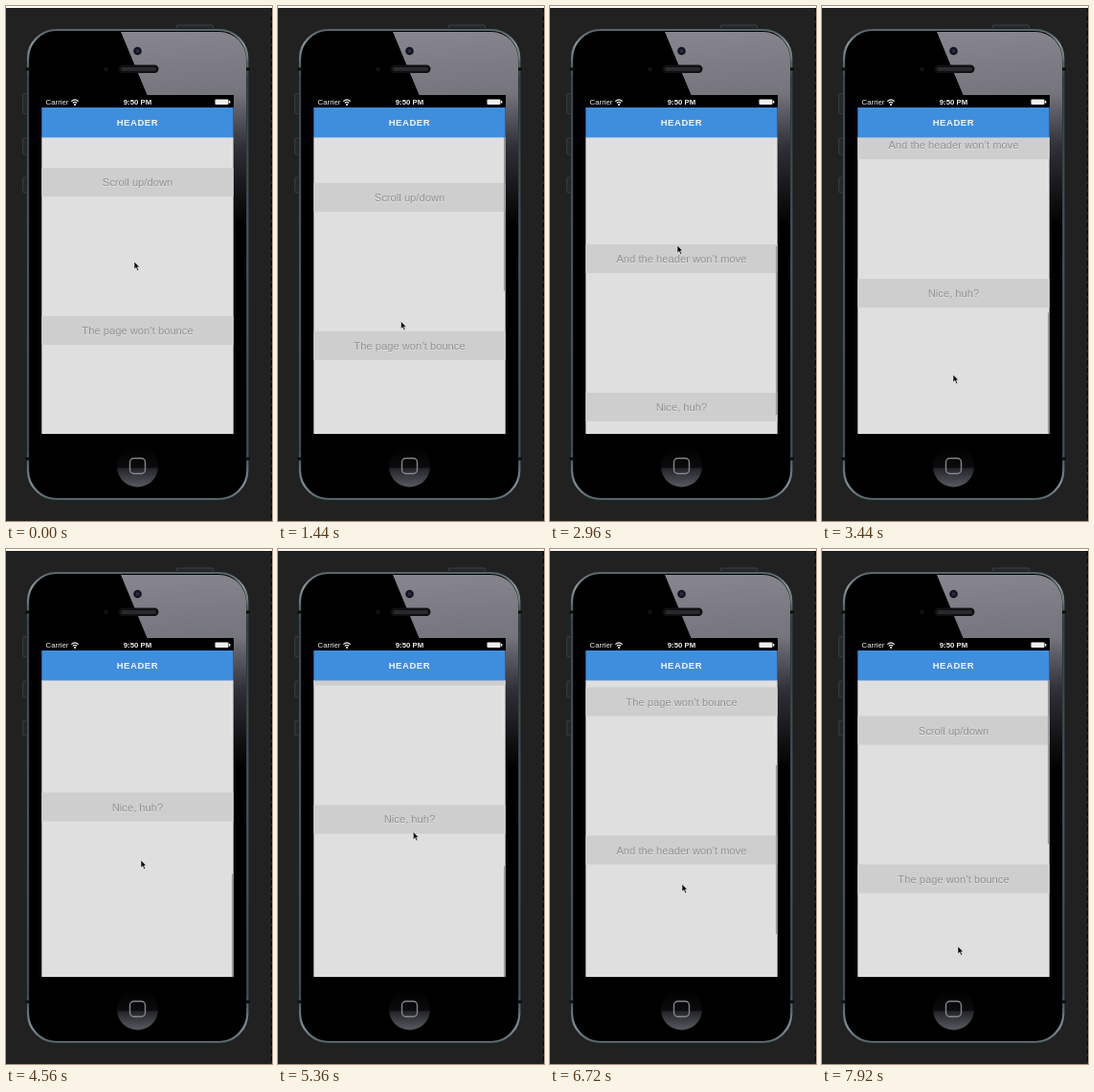
Recreate the animation shown at these times as an HTML page. Size 278x538 px, loop 8000 ms.

```html
<!DOCTYPE html>
<html lang="en">
<head>
<meta charset="utf-8">
<title>Scroll demo</title>
<style>
html, body { margin: 0; width: 100%; height: 100%; overflow: hidden; background: #212121; }
svg { display: block; width: 278px; height: 538px; }
text { font-family: "Liberation Sans", Arial, sans-serif; text-anchor: middle; }
.label rect { fill: #cecece; }
.label text { font-size: 11.2px; fill: #929292; text-shadow: 0 1px 0 #e2e2e2; }
.status { font-size: 7.8px; fill: #eee; }
</style>
</head>
<body>
<svg viewBox="0 0 278 538">
  <defs>
    <linearGradient id="rim" x1="0" y1="0" x2="0" y2="1">
      <stop offset="0" stop-color="#59646a"/>
      <stop offset=".03" stop-color="#8d989d"/>
      <stop offset=".1" stop-color="#38454a"/>
      <stop offset=".5" stop-color="#46555b"/>
      <stop offset=".9" stop-color="#3c4c52"/>
      <stop offset=".97" stop-color="#84929a"/>
      <stop offset="1" stop-color="#56646a"/>
    </linearGradient>
    <linearGradient id="glare" gradientUnits="userSpaceOnUse" x1="170" y1="27" x2="185" y2="235">
      <stop offset="0" stop-color="#86848c"/>
      <stop offset=".33" stop-color="#75757d"/>
      <stop offset=".6" stop-color="#2f3038"/>
      <stop offset="1" stop-color="#000"/>
    </linearGradient>
    <linearGradient id="home" x1="0" y1="0" x2="0" y2="1">
      <stop offset="0" stop-color="#000"/>
      <stop offset=".52" stop-color="#0b0b0d"/>
      <stop offset=".56" stop-color="#25262b"/>
      <stop offset="1" stop-color="#575a61"/>
    </linearGradient>
    <clipPath id="face"><rect x="25" y="27" width="226" height="486" rx="28"/></clipPath>
    <clipPath id="page"><rect x="37.3" y="137" width="200.4" height="310"/></clipPath>
  </defs>

  <rect width="278" height="538" fill="#212121"/>
  <rect width="278" height="2" fill="#fff"/>
  <path d="M277.4 2V538" stroke="#000" stroke-dasharray="5 3"/>

  <g fill="#22282b" stroke="#454c50" stroke-width=".7">
    <rect x="17.7" y="91.5" width="5" height="21" rx="1"/>
    <rect x="17.7" y="138" width="5" height="17" rx="1.5"/>
    <rect x="17.7" y="179" width="5" height="16" rx="1.5"/>
    <rect x="178.5" y="20" width="38" height="4" rx="1"/>
  </g>
  <rect x="21" y="23" width="233.3" height="494" rx="32" fill="#1b2529"/>
  <rect x="23" y="25" width="229.3" height="490" rx="30" fill="#000" stroke="url(#rim)" stroke-width="2.2"/>
  <path d="M20.5 66H25M250 66H254.8M20.5 473H25M250 473H254.8" stroke="#0a0c0d" stroke-width="3"/>

  <path d="M120 27H252V240H238V93H147.5Z" fill="url(#glare)" clip-path="url(#face)"/>
  <circle cx="137.5" cy="47" r="4.3" fill="#14151c"/>
  <circle cx="137.5" cy="47" r="2" fill="#262b4c"/>
  <circle cx="104.5" cy="66" r="2.2" fill="#131316"/>
  <rect x="117.5" y="61.5" width="42" height="8.5" rx="4.2" fill="#101012"/>
  <rect x="120" y="64" width="37" height="4" rx="2" fill="#29292c"/>

  <circle cx="137.5" cy="481" r="21.5" fill="url(#home)"/>
  <rect x="129.5" y="472.5" width="16" height="16" rx="4" fill="none" stroke="#85878a" stroke-width="1.4"/>

  <rect x="37.3" y="93" width="200.4" height="354" fill="#000"/>
  <text class="status" x="53.5" y="103">Carrier</text>
  <text class="status" x="137.5" y="103" font-weight="bold">9:50 PM</text>
  <g fill="none" stroke="#eee" stroke-width="1.2">
    <path d="M68.3 99.6Q72 96 75.7 99.6M69.8 101.4Q72 99.3 74.2 101.4"/>
    <circle cx="72" cy="103" r=".5"/>
  </g>
  <rect x="218.5" y="97.5" width="14" height="5.5" rx="1" fill="#eee"/>
  <rect x="233" y="99" width="1.4" height="2.5" fill="#eee"/>

  <g clip-path="url(#page)">
    <rect x="37" y="137" width="201" height="310" fill="#dfdfdf"/>
    <g id="content"></g>
    <rect id="bar" x="236.1" width="1.6" fill="#8d8d8d"/>
  </g>
  <rect x="37.3" y="106" width="200.4" height="31.4" fill="#3f8edd"/>
  <text x="137.4" y="125.2" font-size="9.5" font-weight="bold" letter-spacing=".55" fill="#f2f6fb">HEADER</text>

  <path id="cursor" d="M0 0V8L1.9 6.3L3.3 9.4L4.7 8.8L3.3 5.8H5.7Z" fill="#0a0a0a" stroke="#eee" stroke-width=".6"/>
</svg>
<script>
const LOOP = 8000, STEP = 80;
const TOP = 137, VIEW = 310, BAR = 176.5;
const MAX = 270, SQUASH = .63;
const $ = id => document.getElementById(id);

const labels = ["Scroll up/down", "The page won’t bounce", "And the header won’t move", "Nice, huh?"];
$("content").innerHTML = labels.map((s, i) =>
  `<g class="label" transform="translate(0 ${169 + i * 155})">
    <rect x="37" width="201" height="30"/><text x="137.5" y="19">${s}</text></g>`).join("");

// Turning points of the gestures: [time, content offset, pointer x, pointer y]
const keys = [
  [0, 0, 134, 267],
  [1200, 0, 129, 294],
  [1840, 50, 128, 394],     // pulled past the top
  [2160, 27, 128, 394],
  [2480, 0, 128, 394],
  [2960, -230, 133, 250],   // flung down the page
  [3440, -349, 137, 385],
  [4560, -379.5, 141, 325], // pulled past the bottom
  [5000, -390, 141, 305],
  [6000, -276, 142, 286],   // sprung back
  [6720, -179.5, 138, 350],
  [7920, 5.5, 142, 415]
];

const slope = (k, col) => keys[k] && keys[k + 1]
  ? (keys[k + 1][col] - keys[k][col]) / (keys[k + 1][0] - keys[k][0]) : 0;

// Harmonic mean of both slopes, flat at turning points
function tangent(k, col) {
  const a = slope(k - 1, col), b = slope(k, col);
  return a * b <= 0 ? 0 : 2 * a * b / (a + b);
}

// Monotone cubic through one column of the keys
function sample(t, col) {
  const i = keys.findIndex(k => k[0] > t) - 1;
  if (i < 0) return keys[keys.length - 1][col];
  const [p, q] = [keys[i], keys[i + 1]];
  const h = q[0] - p[0], u = (t - p[0]) / h, v = 1 - u;
  return p[col] * (1 + 2 * u) * v * v + tangent(i, col) * h * u * v * v
    + q[col] * u * u * (3 - 2 * u) - tangent(i + 1, col) * h * u * u * v;
}

// The scroll bar shortens while the page is pulled past an end
function barSpan(y) {
  const over = Math.max(0, y, (-y - MAX) * SQUASH);
  const len = BAR - over;
  const part = Math.min(1, Math.max(0, -y / MAX));
  return [TOP + (VIEW - len) * part, len];
}

const move = (id, x, y) => $(id).setAttribute("transform", `translate(${x} ${y})`);

function draw(time) {
  const t = Math.floor(time % LOOP / STEP) * STEP;
  const y = sample(t, 1);
  const [start, len] = barSpan(y);
  move("content", 0, y);
  move("cursor", sample(t, 2), sample(t, 3));
  $("bar").setAttribute("y", start);
  $("bar").setAttribute("height", len);
  $("bar").setAttribute("opacity", t > keys[1][0] ? 1 : 0);
}

let origin;
function tick(now) {
  origin ??= now;
  draw(now - origin);
  requestAnimationFrame(tick);
}
draw(0);
requestAnimationFrame(tick);
</script>
</body>
</html>
```
